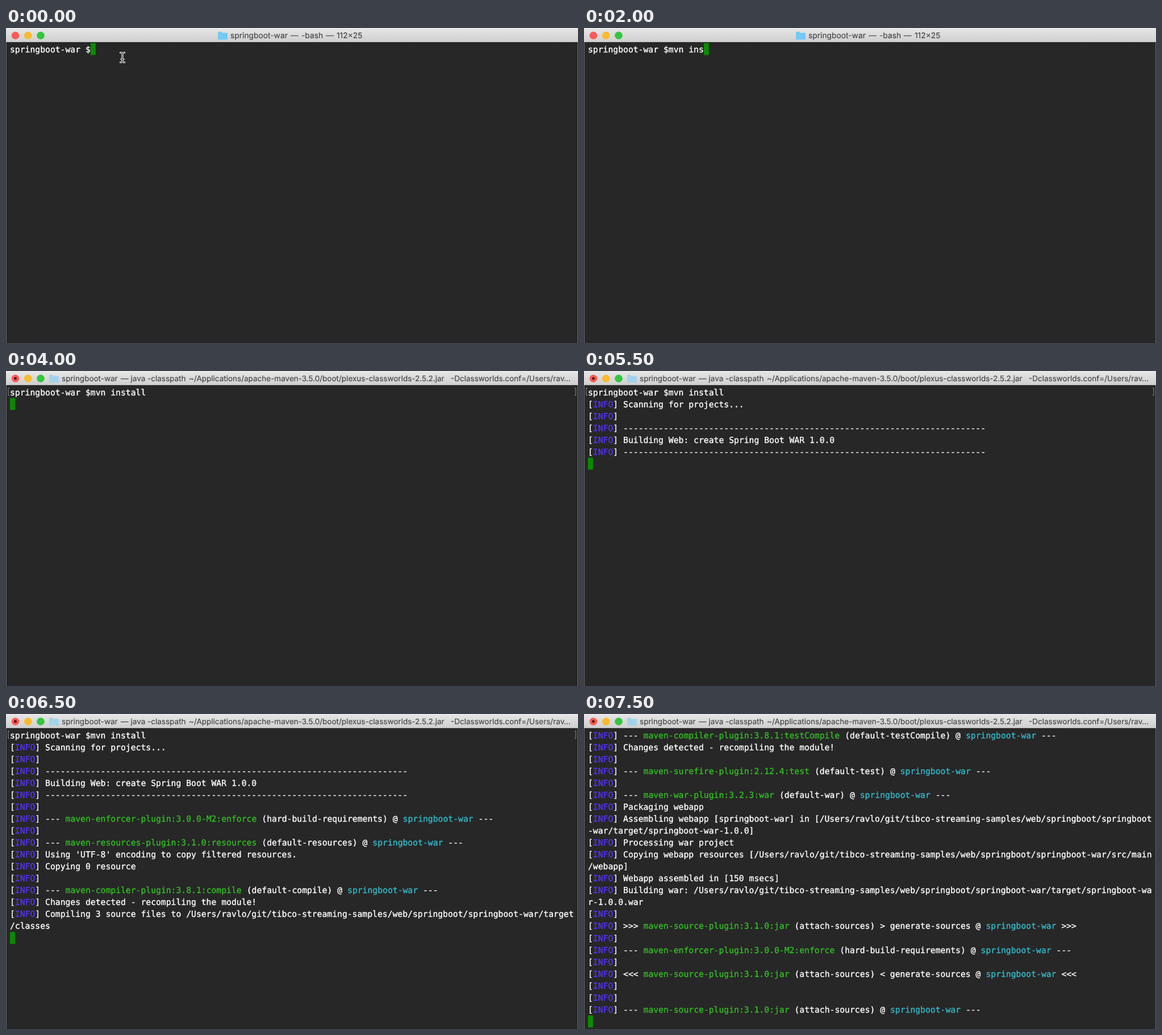
Write an HTML page that moves like this. It is 1007 px wide and 556 px high and loops after 8 s.

```html
<!DOCTYPE html>
<html lang="en">
<head>
<meta charset="utf-8">
<title>Terminal</title>
<style>
html, body { margin: 0; width: 100%; height: 100%; overflow: hidden; background: #272727; }
svg { display: block; width: 1007px; height: 556px; }
text { white-space: pre; text-rendering: geometricPrecision; }
#screen text { font: 14.727px "DejaVu Sans Mono", monospace; stroke-width: .35px; }
.title text { font: 13.8px Inter, sans-serif; stroke-width: .15px; }
#busy text { font-size: 13.5px; }
</style>
</head>
<body>
<svg viewBox="0 0 1007 556" xmlns="http://www.w3.org/2000/svg">
  <defs>
    <linearGradient id="bar" x2="0" y2="1">
      <stop offset="0" stop-color="#e6e6e6"/>
      <stop offset="1" stop-color="#cfcfcf"/>
    </linearGradient>
    <path id="folder" d="M0 1.5Q0 0 1.5 0H5.5L7.5 2H15.5Q17 2 17 3.5V12.5Q17 14 15.5 14H1.5Q0 14 0 12.5Z"/>
    <path id="ibeam" d="M201.5 43.5Q204.5 43.5 205 46Q205.5 43.5 208.5 43.5M205 46V58M201.5 60.5Q204.5 60.5 205 58Q205.5 60.5 208.5 60.5M203 55H207"/>
  </defs>
  <rect width="1007" height="556" fill="#272727"/>
  <path d="M.5 25V556M1006.5 25V556" stroke="#6a6a6a"/>
  <rect width="1007" height="25" fill="url(#bar)"/>
  <path d="M0 .5H1007" stroke="#f0f0f0"/>
  <path d="M0 24.5H1007" stroke="#bdbdbd"/>
  <circle cx="16.5" cy="13.2" r="6.8" fill="#fc5b57"/>
  <circle cx="38.8" cy="13.2" r="6.8" fill="#f9bb2f"/>
  <circle cx="61" cy="13.2" r="6.8" fill="#33c63f"/>
  <circle id="dot" cx="16.5" cy="13.2" r="2.4" fill="#4a0502"/>
  <g id="idle" class="title"><use href="#folder" x="373" y="6.5" fill="#74c9f5"/></g>
  <g id="busy" class="title"><use id="icon" href="#folder" x="76" y="6.5"/></g>
  <path id="marks" d="M6 30H4V43H6M1001 30H1003V43H1001" fill="none" stroke="#8c8c8c"/>
  <rect id="cursor" width="8.9" height="21" fill="#0b8a00"/>
  <g id="screen"></g>
  <g id="beam" fill="none" stroke-linecap="round">
    <use href="#ibeam" stroke="#fff" stroke-width="3.2"/>
    <use href="#ibeam" stroke="#222" stroke-width="1.1"/>
  </g>
</svg>
<script>
const NS = "http://www.w3.org/2000/svg";
const $ = id => document.getElementById(id);
const LOOP = 8000, COLS = 112, ROWS = 25;
const LEFT = 7, CHAR_W = 8.866, TOP = 26.7, ROW_H = 21.06, BASE = 42.5;
const PROMPT = "springboot-war $", COMMAND = "mvn install";

function addText(parent, x, y, str, color) {
  const t = document.createElementNS(NS, "text");
  const attrs = { x, y, fill: color, stroke: color };
  for (const name in attrs) t.setAttribute(name, attrs[name]);
  t.textContent = str;
  parent.append(t);
}

const titles = {
  idle: [[395, "springboot-war"], [501, "—"], [520, "-bash"], [563, "—"], [582, "112×25"]],
  busy: [[98, "springboot-war"], [202, "—"], [219.5, "java"], [249, "-classpath"],
    [322, "~/Applications/apache-maven-3.5.0/boot/plexus-classworlds-2.5.2.jar"],
    [783, "-Dclassworlds.conf=/Users/rav…"]]
};
for (const id in titles)
  for (const [x, str] of titles[id]) addText($(id), x, 18.2, str, "#444");

const repo = "/Users/ravlo/git/tibco-streaming-samples/web/springboot/springboot-war";
const rule = "-".repeat(72);
const encoding = "Using 'UTF-8' encoding to copy filtered resources.";
const changes = "Changes detected - recompiling the module!";
const step = (goal, phase, arrow = "---") =>
  `${arrow} maven-${goal} (${phase} @ springboot-war ${arrow}`;
const enforce = step("enforcer-plugin:3.0.0-M2:enforce", "hard-build-requirements)");
const jar = "source-plugin:3.1.0:jar";

const log = [
  "Scanning for projects...", "", rule,
  "Building Web: create Spring Boot WAR 1.0.0", rule, "",
  enforce, "",
  step("resources-plugin:3.1.0:resources", "default-resources)"),
  encoding, "Copying 0 resource", "",
  step("compiler-plugin:3.8.1:compile", "default-compile)"),
  changes, `Compiling 3 source files to ${repo}/target/classes`, "",
  step("resources-plugin:3.1.0:testResources", "default-testResources)"),
  encoding, `skip non existing resourceDirectory ${repo}/src/test/resources`, "",
  step("compiler-plugin:3.8.1:testCompile", "default-testCompile)"),
  changes, "",
  step("surefire-plugin:2.12.4:test", "default-test)"), "",
  step("war-plugin:3.2.3:war", "default-war)"),
  "Packaging webapp",
  `Assembling webapp [springboot-war] in [${repo}/target/springboot-war-1.0.0]`,
  "Processing war project",
  `Copying webapp resources [${repo}/src/main/webapp]`,
  "Webapp assembled in [150 msecs]",
  `Building war: ${repo}/target/springboot-war-1.0.0.war`, "",
  step(jar, "attach-sources) > generate-sources", ">>>"), "",
  enforce, "",
  step(jar, "attach-sources) < generate-sources", "<<<"), "", "",
  step(jar, "attach-sources)")
];

// Wrap at the terminal width
const lines = [PROMPT + COMMAND];
for (const entry of log) {
  const full = "[INFO] " + entry;
  for (let i = 0; i < full.length; i += COLS) lines.push(full.slice(i, i + COLS));
}

const tokens = /((?<=^\[)INFO|maven-\S+|(?<=@ )springboot-war)/;
const tint = s => s === "INFO" ? "#5833f2" : s.startsWith("maven") ? "#34bc26" : "#35b9c9";

function drawLine(line, row) {
  let col = 0;
  line.split(tokens).forEach((part, i) => {
    const word = part.trim();
    const pad = part.length - part.trimStart().length;
    if (word) {
      addText($("screen"), LEFT + (col + pad) * CHAR_W, BASE + row * ROW_H,
        word, i % 2 ? tint(word) : "#fff");
    }
    col += part.length;
  });
}

// Start time, typed letters, finished lines
const states = [
  [0, 0, 0], [1000, 2, 0], [1500, 4, 0], [2000, 7, 0], [2500, 9, 0], [3000, 11, 0],
  [3500, 11, 1], [4000, 11, 1], [5000, 11, 2], [5500, 11, 6], [6000, 11, 14],
  [6500, 11, 17], [7000, 11, 29], [7500, 11, 47]
];

const show = (id, on) => $(id).setAttribute("visibility", on ? "visible" : "hidden");
let current = null;

function render(time) {
  const state = states.findLast(s => s[0] <= time);
  if (state === current) return;
  current = state;
  const [start, typed, done] = state;
  const scroll = Math.max(0, done - ROWS + 1);
  const input = PROMPT + COMMAND.slice(0, typed);
  const visible = done ? lines.slice(scroll, done) : [input];

  $("screen").replaceChildren();
  visible.forEach(drawLine);
  $("cursor").setAttribute("x", LEFT + (done ? 0 : input.length * CHAR_W));
  $("cursor").setAttribute("y", TOP + (done - scroll) * ROW_H);
  show("beam", start === 0);
  show("idle", !done);
  show("busy", done);
  show("marks", done && !scroll);
  show("dot", start >= 4000);
  $("icon").setAttribute("fill", start >= 4000 ? "#a3d3ea" : "#74c9f5");
}

const origin = performance.now();
function tick() {
  render((performance.now() - origin) % LOOP);
  requestAnimationFrame(tick);
}
tick();
</script>
</body>
</html>
```
